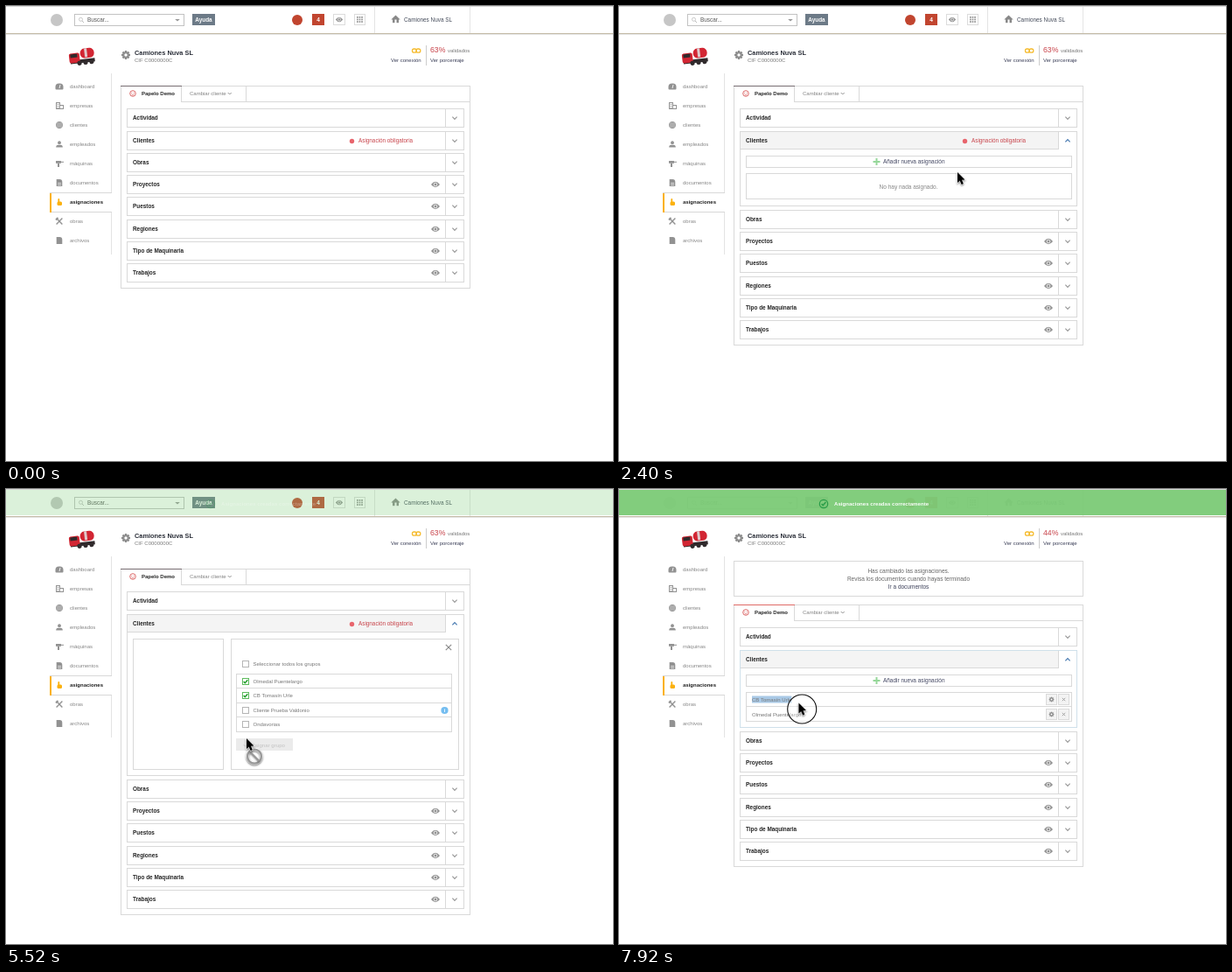
An HTML page with a canvas that plays this animation: 694 px wide and 520 px high, repeating every 8000 ms.

```html
<!DOCTYPE html>
<html lang="es">
<head>
<meta charset="utf-8">
<title>Asignaciones</title>
<style>
html, body { margin: 0; width: 100%; height: 100%; overflow: hidden; background: #fff; }
canvas { display: block; }
</style>
</head>
<body>
<canvas id="stage" width="694" height="520"></canvas>
<script>
const c = document.getElementById('stage').getContext('2d');
const LOOP = 8000, STEP = 80;
const FONT = '"Liberation Sans", Arial, sans-serif';
const COMPANY = 'Camiones Nuva SL';
const CLIENTS = ['Olmedal Puentelargo', 'CB Tomasín Urle', 'Cliente Prueba Valdonio', 'Ondavorias'];
const ROWS = ['Actividad', 'Clientes', 'Obras', 'Proyectos', 'Puestos', 'Regiones', 'Tipo de Maquinaria', 'Trabajos'];
const LINE = '#d9d9d9', GREY = '#929292', RED = '#c8454c', YELLOW = '#fbb10e', NAVY = '#3b3f58';
const OPENED = 1600, ADDING = 2640, SENT = 4640, CONFIRMED = 5360, LISTED = 6480;

// Places where the pointer stops, and how long it presses there.
const STOPS = [
  { at: 80, x: 545, y: 535 },
  { at: 800, x: 476, y: 167, travel: 720, press: 160 },
  { at: 1440, x: 512, y: 151, press: 240, hand: true },
  { at: 2400, x: 387, y: 190 },
  { at: 2640, x: 330, y: 177, press: 80, hand: true },
  { at: 3520, x: 276, y: 220, press: 80 },
  { at: 4000, x: 274, y: 236, press: 160 },
  { at: 4400, x: 275, y: 285, press: 240, hand: true },
  { at: 7520, x: 151, y: 236, travel: 900, press: 400 },
  { at: 7920, x: 205.5, y: 244.5, press: 80 }
];

const ramp = (t, from, to) => Math.min(1, Math.max(0, (t - from) / (to - from)));
const smooth = p => p * p * (3 - 2 * p);

function pointerAt(t) {
  const i = STOPS.findIndex(s => s.at > t);
  const prev = STOPS.at(i < 0 ? -1 : i - 1), next = i < 0 ? prev : STOPS[i];
  const leave = Math.max(prev.at, next.at - (next.travel || 400));
  const p = prev === next ? 1 : smooth(ramp(t, leave, next.at));
  return {
    x: prev.x + (next.x - prev.x) * p,
    y: prev.y + (next.y - prev.y) * p,
    pressed: t < prev.at + (prev.press || 0),
    hand: (p < .5 ? prev : next).hand
  };
}

function text(s, x, y, size, color, bold = false, align = 'left') {
  c.font = `${bold ? 'bold ' : ''}${size}px ${FONT}`;
  c.textAlign = align;
  c.textBaseline = 'middle';
  c.fillStyle = color;
  c.fillText(s, x, y + .5);
}

function rect(x, y, w, h, color) {
  c.fillStyle = color;
  c.fillRect(x, y, w, h);
}

function box(x, y, w, h, color = LINE, fill) {
  if (fill) rect(x, y, w, h, fill);
  c.strokeStyle = color;
  c.lineWidth = 1;
  c.strokeRect(x + .5, y + .5, w - 1, h - 1);
}

function pill(x, y, w, h, r, color) {
  c.fillStyle = color;
  c.beginPath();
  c.roundRect(x, y, w, h, r);
  c.fill();
}

function disc(x, y, r, color) {
  pill(x - r, y - r, 2 * r, 2 * r, r, color);
}

function ring(x, y, r, color, width = 1, from = 0, to = 2 * Math.PI) {
  c.strokeStyle = color;
  c.lineWidth = width;
  c.beginPath();
  c.arc(x, y, r, from, to);
  c.stroke();
}

function stroke(x, y, points, color, width = 1) {
  c.beginPath();
  for (const [dx, dy] of points) c.lineTo(x + dx, y + dy);
  c.strokeStyle = color;
  c.lineWidth = width;
  c.stroke();
}

// Isosceles triangle with its base at y and its tip h below.
function triangle(x, y, half, h, color) {
  c.beginPath();
  c.moveTo(x - half, y);
  c.lineTo(x + half, y);
  c.lineTo(x, y + h);
  c.fillStyle = color;
  c.fill();
}

function chevron(x, y, color = '#999', dir = 1, s = 2.6, width = 1.2) {
  const rise = s / 2 * dir;
  stroke(x, y, [[-s, -rise], [0, rise], [s, -rise]], color, width);
}

function cross(x, y, s, color, width = 1) {
  stroke(x, y, [[-s, -s], [s, s]], color, width);
  stroke(x, y, [[-s, s], [s, -s]], color, width);
}

function tick(x, y, s, color) {
  stroke(x, y, [[-s, 0], [-s / 3, s * .7], [s, -s * .8]], color, 1.4);
}

function eye(x, y, s = 5) {
  c.fillStyle = GREY;
  c.beginPath();
  c.moveTo(x - s, y);
  c.quadraticCurveTo(x, y - s * 1.3, x + s, y);
  c.quadraticCurveTo(x, y + s * 1.3, x - s, y);
  c.fill();
  ring(x, y, s * .38, '#fff', s * .16);
}

function gear(x, y, r, color) {
  for (let i = 0; i < 4; i++) {
    const a = i * Math.PI / 4, dx = Math.cos(a) * r, dy = Math.sin(a) * r;
    stroke(x, y, [[-dx, -dy], [dx, dy]], color, r * .45);
  }
  disc(x, y, r * .75, color);
  disc(x, y, r * .34, '#fff');
}

function page(x, y) {
  pill(x - 3.3, y - 4, 6.6, 8, [0, 3, 0, 0], GREY);
}

const MENU = {
  dashboard(x, y) {
    pill(x - 4.5, y - 3.5, 9, 7, [4, 4, 1, 1], GREY);
    stroke(x, y, [[0, 2], [1, -2]], '#fff', .9);
  },
  empresas(x, y) {
    box(x - 4, y - 4, 5, 8, GREY);
    box(x, y - 1, 5, 5, GREY);
    for (let i = -1; i < 2; i++) rect(x - 2.3, y + 2 * i, 1.6, .9, GREY);
  },
  clientes(x, y) {
    disc(x, y, 3.9, GREY);
    for (let i = -1; i < 2; i++) stroke(x + 2 * i, y, [[0, -3], [0, 3]], '#fff', .5);
  },
  empleados(x, y) {
    disc(x, y - 1.8, 1.9, GREY);
    pill(x - 3.8, y + .8, 7.6, 2.8, [2.5, 2.5, 0, 0], GREY);
  },
  'máquinas'(x, y) {
    rect(x - 4, y - 3, 6, 2.8, GREY);
    rect(x + 2, y - 2.2, 3, 1, GREY);
    rect(x - 2, y, 2, 4, GREY);
  },
  documentos(x, y) {
    page(x, y);
    for (let i = 0; i < 2; i++) rect(x - 1.8, y + 2 * i, 3.8, .7, '#fff');
  },
  asignaciones(x, y) {
    pill(x - 1.6, y - 4, 1.8, 6, 1, YELLOW);
    pill(x - 2.5, y - .5, 5.5, 4.5, 1.5, YELLOW);
  },
  obras(x, y) {
    cross(x, y, 3.4, GREY, 1.4);
    stroke(x, y, [[-4, -1.5], [-1.5, -4]], GREY, 1.8);
  },
  archivos: page
};

function header() {
  rect(0, 0, 694, 1, '#d6d6d6');
  rect(0, 31, 694, 1, '#c4bba6');
  rect(0, 32, 694, 1, '#e6e6e6');
  for (const x of [421, 530]) rect(x, 1, 1, 30, '#e4e4e4');
  disc(58, 16, 7, '#c6c6c6');
  box(78, 9, 126, 14, '#c2c2c2');
  ring(85.5, 15.3, 2, '#bbb', .8);
  stroke(87, 17, [[0, 0], [2, 2]], '#bbb');
  text('Buscar...', 93, 16, 6.4, '#555');
  triangle(196, 15, 2.8, 2.6, '#999');
  rect(213, 9, 26, 13, '#6c7a87');
  text('Ayuda', 226, 16, 6.4, '#fff', true, 'center');
  disc(333, 16, 6, '#c1452f');
  rect(350, 9, 14, 13, '#c1452f');
  text('4', 357, 15.5, 6.5, '#fff', true, 'center');
  box(374, 9, 14, 13, '#dcdcdc');
  eye(381, 15.5, 4.2);
  box(398, 9, 13, 13, '#dcdcdc');
  for (let i = 0; i < 9; i++) rect(401 + i % 3 * 2.6, 12 + (i / 3 | 0) * 2.6, 1.7, 1.7, GREY);
  triangle(445.5, 15.5, 5.2, -5, '#888');
  for (const x of [442, 446.5]) rect(x, 15, 2.5, 4.2, '#888');
  text(COMPANY, 455, 16.2, 6.4, '#444b5a');
}

function truck() {
  const red = '#d22633', dark = '#302a2c';
  c.save();
  c.translate(86, 57);
  c.rotate(-.12);
  rect(-13, 4, 28, 4, dark);
  pill(-14, -4, 12, 11, 2, red);
  rect(-12.5, -3, 8, 4, dark);
  pill(-1, -8, 16, 11, 5, red);
  rect(4, -8, 3, 10, '#dfc9cb');
  for (let i = 0; i < 3; i++) disc(-3 + 7 * i, 8, 2.6, dark);
  c.restore();
}

function profile(percent) {
  truck();
  gear(137, 56, 5, '#8c8c8c');
  text(COMPANY, 147, 53.5, 7.4, '#2a2e38', true);
  text('CIF C0000000C', 147, 61.8, 6, '#777');
  c.strokeStyle = '#f5bb2e';
  c.lineWidth = 1.3;
  for (const x of [464.5, 469]) {
    c.beginPath();
    c.roundRect(x, 49, 4.8, 4.2, 2);
    c.stroke();
  }
  text('Ver conexión', 440, 61.8, 6, NAVY);
  rect(480, 45, 1, 23, '#ccc');
  text(percent, 485, 50, 8.7, RED);
  text('validados', 505, 51, 6, '#777');
  text('Ver porcentaje', 485, 61.8, 6, NAVY);
}

function sidebar() {
  rect(120, 77, 1, 207, '#e3e3e3');
  rect(50, 213, 71, 23, '#fff');
  for (const y of [213, 235]) rect(50, y, 71, 1, '#d8d8d8');
  rect(50, 214, 2, 22, YELLOW);
  Object.entries(MENU).forEach(([name, icon], i) => {
    const y = 92 + 22 * i, active = name === 'asignaciones';
    icon(61, y);
    text(name, 73, y, 6, active ? '#222' : '#858585', active);
  });
}

function tabs(y, bottom, changed) {
  box(131, y, 400, bottom - y);
  rect(201, y + 18, 329, 1, LINE);
  for (const x of [200, 274]) rect(x, y, 1, 19, LINE);
  rect(131, y, 70, 1, changed ? '#df6a66' : '#776d72');
  ring(145, y + 9, 3.3, '#d85a5a', .9);
  for (const dx of [-1.2, 1.2]) disc(145 + dx, y + 8.2, .5, '#d85a5a');
  ring(145, y + 9.3, 1.5, '#d85a5a', .7, .3, 2.8);
  text('Papelo Demo', 155, y + 9, 6, '#222', true);
  text('Cambiar cliente', 210, y + 9, 6, '#808080');
  chevron(255.7, y + 9, '#888', 1, 2, .9);
}

function addButton(y) {
  box(145, y, 373, 14);
  rect(290.5, y + 6, 8, 2, '#96d79a');
  rect(293.5, y + 3, 2, 8, '#96d79a');
  text('Añadir nueva asignación', 302, y + 6.7, 6.45, '#454964');
}

function checkbox(y, label, checked) {
  box(270, y - 4, 8, 8, checked ? '#5dbb5d' : '#b5b5b5');
  if (checked) tick(274, y, 2.3, '#189a22');
  text(label, 282.5, y, 6, '#777');
}

function form(y, t) {
  box(145, y + 28, 104, 150);
  box(257, y + 28, 261, 150);
  cross(506, y + 38, 3.2, '#888', 1.1);
  checkbox(y + 57, 'Seleccionar todos los grupos');
  box(263, y + 68, 247, 67);
  const checkedAt = [3600, 4080];
  CLIENTS.forEach((name, i) => {
    const mid = y + 77 + Math.round(16.4 * i);
    if (i) rect(264, mid - 9, 245, 1, LINE);
    checkbox(mid, name, t >= checkedAt[i]);
  });
  disc(501.5, y + 110, 4.1, '#74bdf0');
  text('i', 501.5, y + 110, 6, '#fff', true, 'center');
  if (t < SENT) {
    box(263, y + 142, 53, 12, '#eda70f', '#fbb317');
    text('Asignar grupo', 289.5, y + 148, 5.7, '#fff', true, 'center');
  } else {
    rect(263, y + 142, 65, 14, '#ebebeb');
    ring(274, y + 148.5, 2.4, '#cfcfcf', .9, t / 130, t / 130 + 4.5);
    text('Asignar grupo', 281, y + 149.5, 6.1, '#c2c2c2');
  }
}

function assigned(y, t) {
  addButton(y + 28);
  box(145, y + 48, 373, 34);
  rect(146, y + 64, 371, 1, LINE);
  [CLIENTS[1], CLIENTS[0]].forEach((name, i) => {
    const mid = y + 56.5 + i * 17;
    c.font = `6px ${FONT}`;
    const reach = Math.min(pointerAt(t).x - 152, c.measureText(name).width);
    if (!i && t >= 7600) rect(152, mid - 4, reach, 8, '#a9c9e6');
    text(name, 152, mid, 6, '#777');
    for (const x of [488, 502]) box(x, mid - 6.5, 13, 13, '#dadada', '#f3f3f3');
    gear(494.5, mid, 2.8, '#888');
    cross(508.5, mid, 1.7, '#999', .9);
  });
}

function openClients(y, extra, t) {
  const done = t > LISTED, h = Math.round(21 + extra);
  box(138, y, 386, h, done ? '#cfe0ea' : LINE);
  rect(139, y + 1, 363, 20, '#f4f4f4');
  rect(139, y + 20, 364, 1, LINE);
  rect(502, y + 1, 1, 20, LINE);
  chevron(513, y + 11, '#4679b0', -1);
  c.save();
  c.beginPath();
  c.rect(138, y + 21, 386, h - 22);
  c.clip();
  if (done) assigned(y, t);
  else if (t > ADDING) form(y, t);
  else {
    addButton(y + 28);
    box(145, y + 48, 373, 30);
    text('No hay nada asignado.', 331, y + 63.5, 6.5, '#858585', false, 'center');
  }
  c.restore();
}

function rows(shift, extra, t) {
  ROWS.forEach((name, i) => {
    const y = Math.round(117.4 + 25.25 * i + shift + (i > 1 ? extra : 0)), mid = y + 11;
    if (i === 1 && extra > 0) openClients(y, extra, t);
    else {
      box(138, y, 386, 22);
      rect(502, y, 1, 22, LINE);
      chevron(513, mid);
    }
    text(name, 145, mid, 6.4, '#222', true);
    if (i > 2) eye(491, mid);
    if (i === 1 && t <= LISTED) {
      disc(395.5, mid + .5, 2.7, '#e8656d');
      text('Asignación obligatoria', 403, mid, 6.35, RED);
    }
  });
}

function notice() {
  const lines = ['Has cambiado las asignaciones.', 'Revisa los documentos cuando hayas terminado', 'Ir a documentos'];
  box(131, 82, 400, 41);
  lines.forEach((s, i) => text(s, 331, 94 + 9 * i, 6.5, i === 2 ? NAVY : '#666', false, 'center'));
}

function banner(alpha) {
  c.save();
  c.globalAlpha = alpha;
  rect(0, 1, 694, 29, '#7dcb78');
  ring(234, 17, 4.7, '#249b45', 1.2);
  tick(234, 17, 2.4, '#249b45');
  text('Asignaciones creadas correctamente', 246, 17, 6.1, '#fff', true);
  c.restore();
}

function arrow(x, y) {
  const outline = [[0, 0], [0, 12], [2.7, 9.6], [4.7, 14], [6.8, 13], [4.9, 8.8], [8.5, 8.6], [0, 0]];
  stroke(x, y, outline, '#fff', 1.5);
  c.fillStyle = '#000';
  c.fill();
}

function hand(x, y) {
  for (const [grow, color] of [[.8, '#333'], [0, '#fff']]) {
    const part = (dx, dy, w, h) => pill(x + dx - grow, y + dy - grow, w + 2 * grow, h + 2 * grow, 2, color);
    part(-1, 0, 2.6, 10);
    part(-3, 7, 4, 4);
    part(0, 5, 10, 9);
  }
  for (let i = 1; i < 4; i++) rect(x + 1 + 2.2 * i, y + 8, .7, 4, '#666');
}

function forbidden(x, y) {
  ring(x, y, 8, '#fff', 4);
  ring(x, y, 8, '#999', 2.2);
  stroke(x, y, [[-5.5, -5.5], [5.5, 5.5]], '#999', 2.2);
}

function pointer(t) {
  if (t < 160) return;
  const p = pointerAt(t), waiting = t >= SENT && t <= LISTED;
  if (p.pressed) {
    disc(p.x + 3.7, p.y + 7, 16.5, 'rgba(255,255,255,.3)');
    ring(p.x + 3.7, p.y + 7, 16.5, '#111', 1.1);
  }
  c.save();
  c.shadowColor = 'rgba(0,0,0,.35)';
  c.shadowBlur = 2;
  c.shadowOffsetY = 1;
  if (waiting) forbidden(p.x + 9, p.y + 20.5);
  if (p.hand && t < SENT) hand(p.x, p.y);
  else arrow(p.x, p.y);
  c.restore();
}

function draw(now) {
  const t = Math.floor(now % LOOP / STEP) * STEP;
  const listing = ramp(t, LISTED, LISTED + 160), done = listing > 0;
  const extra = 65 * ramp(t, OPENED, OPENED + 320) + 99 * ramp(t, ADDING, ADDING + 160) - 96 * listing;
  const shift = 41 * listing;
  rect(0, 0, 694, 520, '#fff');
  header();
  profile(done ? '44%' : '63%');
  sidebar();
  tabs(Math.round(91 + shift), Math.round(322.5 + shift + extra), done);
  rows(shift, extra, t);
  if (listing === 1) notice();
  banner(.955 * ramp(t, CONFIRMED, CONFIRMED + 560));
  pointer(t);
}

const start = performance.now();
function frame() {
  draw(performance.now() - start);
  requestAnimationFrame(frame);
}
frame();
</script>
</body>
</html>
```
